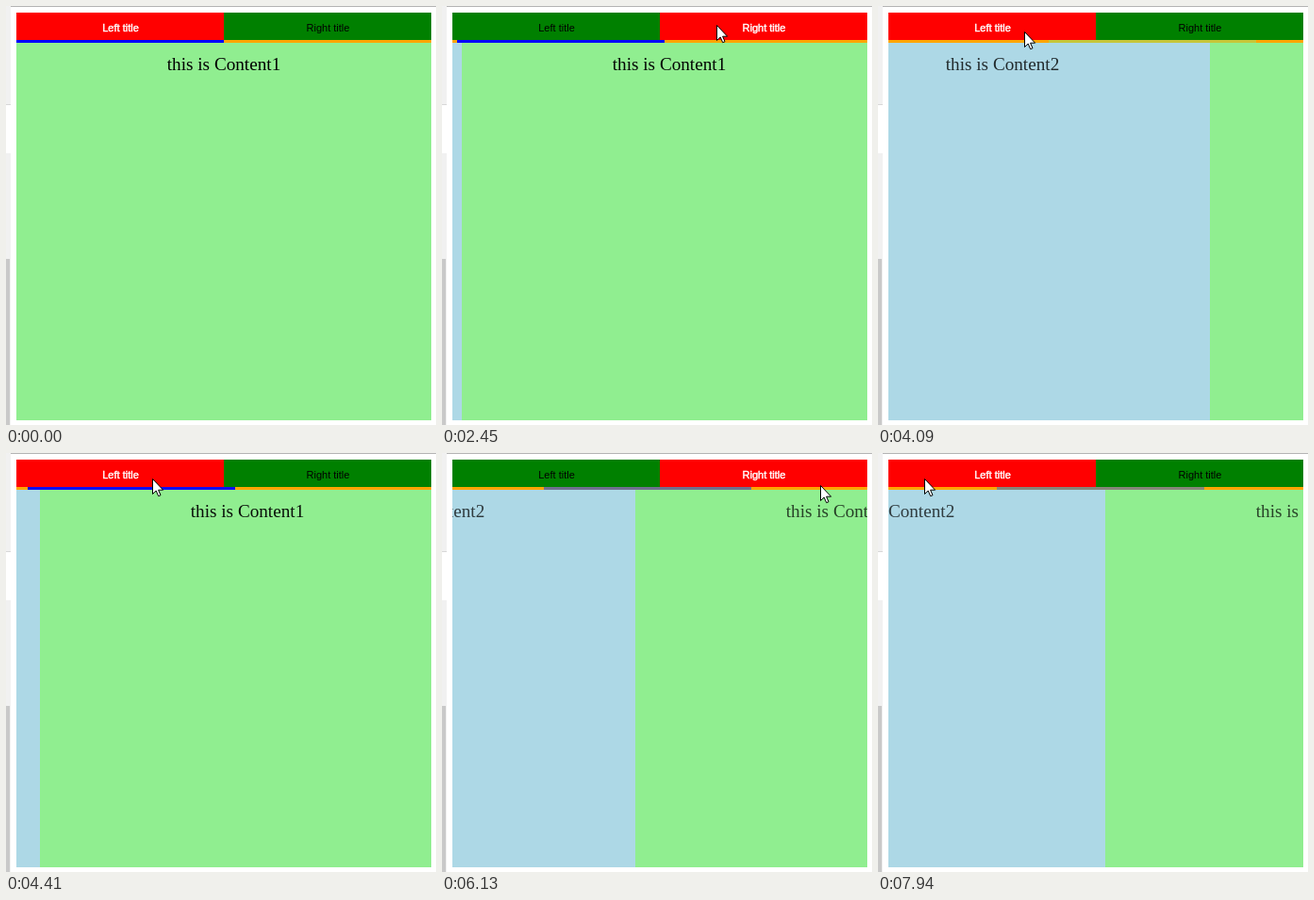
An HTML page that plays this animation: 456x444 px, repeating every 8000 ms.

```html
<!DOCTYPE html>
<html lang="en">
<head>
<meta charset="utf-8">
<title>Sliding tabs</title>
<style>
  html, body { margin: 0; width: 100%; height: 100%; overflow: hidden; background: #fff; }
  svg { display: block; width: 456px; height: 444px; }
  text { text-anchor: middle; }
  .tab rect { fill: green; }
  .tab text { font: 11px "Liberation Sans", Arial, sans-serif; fill: #000; }
  .tab.active rect { fill: red; }
  .tab.active text { fill: #fff; stroke: #fff; stroke-width: .45px; }
  .page text { font: 19.2px "Liberation Serif", "Times New Roman", serif; }
</style>
</head>
<body>
<svg viewBox="0 0 456 444">
  <defs>
    <clipPath id="view"><rect x="11" y="39" width="440" height="400"/></clipPath>
  </defs>

  <!-- window edges -->
  <g shape-rendering="crispEdges">
    <rect width="5" height="444" fill="#f1f1f1"/>
    <rect y="104" width="5" height="52" fill="#fff"/>
    <rect y="104" width="5" height="1" fill="#d8d8d8"/>
    <rect y="268" width="4" height="176" fill="#c9c9c9"/>
    <rect x="5" width="451" height="1" fill="#b4b4b4"/>
  </g>

  <g class="tab" id="left">
    <rect x="11" y="7" width="220" height="29"/>
    <text x="121.5" y="27">Left title</text>
  </g>
  <g class="tab" id="right">
    <rect x="231" y="7" width="220" height="29"/>
    <text x="341.5" y="27">Right title</text>
  </g>

  <rect x="11" y="36" width="440" height="3" fill="orange"/>
  <rect id="marker" y="36" width="220" height="3"/>

  <g clip-path="url(#view)">
    <g id="pages">
      <g class="page">
        <rect x="11" y="39" width="440" height="400" fill="lightblue"/>
        <text x="231" y="68">this is Content2</text>
      </g>
      <g class="page" transform="translate(440)">
        <rect x="11" y="39" width="440" height="400" fill="lightgreen"/>
        <text x="231" y="68">this is Content1</text>
      </g>
    </g>
  </g>

  <path id="cursor" d="M.5 .5V16.5L4.2 13 6.7 18.7 9 17.7 6.6 12.2H11.6Z" fill="#fff" stroke="#000"/>
</svg>
<script>
  const LOOP = 8000, SLIDE = 600;

  // Each click switches the tab at once; its slide runs from `start`.
  const clicks = [
    { at: 2450, start: 2392 },
    { at: 3780, start: 3902 },
    { at: 5700, start: 5854 },
    { at: 7460, start: 7650 },
  ];

  // The pointer enters at `entry`, then makes straight moves and rests between them.
  const entry = { x: 181, y: 355 };
  const moves = [
    { from: 580, to: 1120, x: 150, y: 16 },
    { from: 1440, to: 1580, x: 182, y: 18 },
    { from: 1730, to: 1810, x: 173, y: 20 },
    { from: 1970, to: 2220, x: 291, y: 20 },
    { from: 2950, to: 3160, x: 249, y: 27 },
    { from: 3160, to: 3470, x: 155, y: 27 },
    { from: 4660, to: 5338, x: 397, y: 32 },
    { from: 5450, to: 5520, x: 401, y: 34 },
    { from: 6280, to: 6910, x: 49, y: 27 },
  ];

  const $ = id => document.getElementById(id);
  const left = $('left'), right = $('right'), marker = $('marker');
  const pages = $('pages'), cursor = $('cursor');
  const texts = document.querySelectorAll('.page text');

  const clamp = p => Math.min(1, Math.max(0, p));
  const swing = p => (1 - Math.cos(Math.PI * clamp(p))) / 2;

  function pointer(t) {
    let { x, y } = entry;
    for (const m of moves) {
      const k = clamp((t - m.from) / (m.to - m.from));
      x += (m.x - x) * k;
      y += (m.y - y) * k;
    }
    return [Math.round(x), Math.round(y)];
  }

  function render(t) {
    const done = clicks.filter(c => t >= c.at);
    const onRight = done.length % 2 === 1;
    left.classList.toggle('active', !onRight);
    right.classList.toggle('active', onRight);

    // 0 = first content, 1 = second content
    const pos = done.reduce((sum, c, i) =>
      sum + (i % 2 ? -1 : 1) * swing((t - c.start) / SLIDE), 0);
    pages.setAttribute('transform', `translate(${Math.round(440 * (pos - 1))})`);
    texts.forEach(el => el.setAttribute('fill-opacity', 1 - 1.1 * pos * (1 - pos)));

    const c = Math.round(255 * pos);
    marker.setAttribute('x', Math.round(11 + 220 * pos));
    marker.setAttribute('fill', `rgb(${c},${c},${255 - c})`);

    cursor.setAttribute('visibility', t >= moves[0].from ? 'visible' : 'hidden');
    cursor.setAttribute('transform', `translate(${pointer(t)})`);
  }

  function tick() {
    render(performance.now() % LOOP);
    requestAnimationFrame(tick);
  }
  tick();
</script>
</body>
</html>
```
